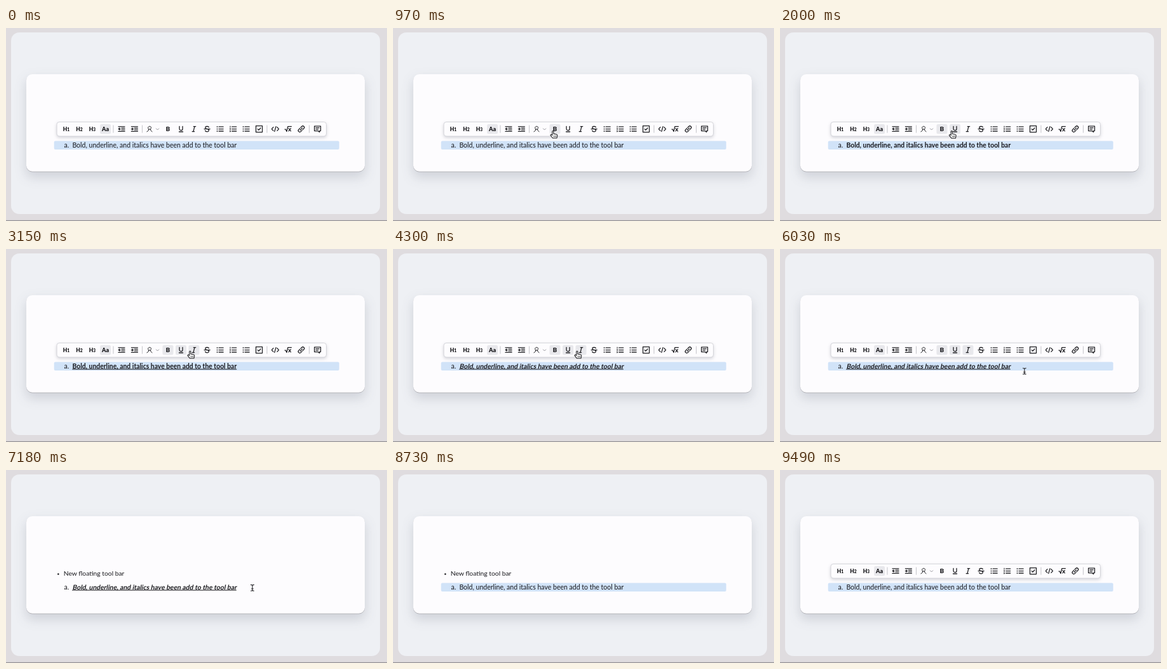
Recreate the animation shown at these times as an HTML page. Size 600x305 px, loop 9550 ms.

```html
<!DOCTYPE html>
<html lang="en">
<head>
<meta charset="utf-8">
<title>Floating tool bar</title>
<style>
html, body { margin: 0; width: 100%; height: 100%; overflow: hidden; background: #dfdcdf; }
svg { display: block; width: 100%; height: 100%; }
text { font-family: Lato, "Open Sans", sans-serif; fill: #17171b; }
.body { font-size: 10.53px; }
.bold { font-size: 10.4px; font-weight: 700; }
.line { fill: none; stroke: #202024; stroke-width: 1.3; stroke-linecap: round; stroke-linejoin: round; }
.thin { stroke-width: 1; }
.pill { fill: #e8e8ec; }
.card { filter: drop-shadow(0 8px 9px rgba(50, 55, 75, .17)); }
.bar { filter: drop-shadow(0 2px 2.5px rgba(50, 55, 75, .2)); }
</style>
</head>
<body>
<svg viewBox="0 0 600 305">
  <rect width="600" height="305" fill="#dfdcdf"/>
  <rect y="303.8" width="600" height="1.2" fill="#918f92"/>
  <rect x="8" y="7" width="581" height="287" rx="13" fill="#eef0f4"/>
  <g class="card">
    <rect x="32" y="74" width="533" height="153.5" rx="9.5" fill="#a9a9ae"/>
    <rect x="32" y="73" width="533" height="153.7" rx="9.5" fill="#fdfcfe"/>
  </g>
  <circle cx="82.3" cy="164.5" r="1.3" fill="#17171b"/>
  <text x="90.7" y="167.4" font-size="10.3">New floating tool bar</text>
  <rect id="mark" x="75.7" y="178.4" width="449" height="13.6" rx="2" fill="#d1e3f8"/>
  <text class="body" x="91.6" y="188.5">a.</text>
  <g transform="translate(104.4 188.5)"><text id="copy" class="body"></text></g>
  <g id="bar">
    <rect class="bar" x="80" y="148.5" width="424.5" height="22.5" rx="4" fill="#fdfcfe" stroke="#d2d2d7" stroke-width=".9"/>
    <g id="pills"></g>
    <g id="icons"></g>
  </g>
  <g id="hand">
    <path d="M-1.2 .4C-1.2-.9 .9-.9 .9 .4V4.1L5.2 5C6.5 5.3 7 6.1 6.8 7.3L6 11H-.4L-3.8 6.9C-4.5 5.9-3.2 4.8-2.3 5.5L-1.2 6.5Z"
      fill="#fff" stroke="#222226" stroke-width="1.1" stroke-linejoin="round"/>
    <path d="M1.2 7.2V9.2M3 7.2V9.2M4.7 7.2V9.2" class="line" stroke-width=".7" style="stroke-width:.7"/>
  </g>
  <path id="beam" class="line" style="stroke-width:1.1"
    d="M-2.4-4.8Q0-4.8 0-3.5Q0-4.8 2.4-4.8M0-3.5V3.5M-2.4 4.8Q0 4.8 0 3.5Q0 4.8 2.4 4.8M-1.3 1.6H1.3"/>
</svg>
<script>
const LOOP = 9550;
const $ = id => document.getElementById(id);
const MID = 159.6;

// Toolbar icons, each drawn around its own centre
const path = (d, cls = "") => `<path class="line ${cls}" d="${d}"/>`;
const label = (s, size, attrs = "") =>
  `<text text-anchor="middle" y="${size * 0.36}" font-size="${size}" font-weight="900" ${attrs}>${s}</text>`;
const heading = n => label(`H<tspan font-size="6.6">${n}</tspan>`, 8.4);
const rows = path("M-2-3.4H5M-2 0H5M-2 3.4H5");
const dots = [-3.4, 0, 3.4].map(y => `<circle cx="-4.6" cy="${y}" r=".9" fill="#202024"/>`).join("");
const indent = arrow => path("M-5-3.8H5M0-1.3H5M0 1.3H5M-5 3.8H5") + path(arrow);
const divider = '<path d="M0-6V6" stroke="#c3c3c8" stroke-width="1"/>';

const icons = [
  [95, heading(1)], [115.4, heading(2)], [136, heading(3)],
  [156.6, label("Aa", 9)],
  [169, divider],
  [182, indent("M-3-1.5L-4.7 0L-3 1.5M-4.5 0H-2")],
  [202.4, indent("M-3.6-1.5L-2 0L-3.6 1.5M-5 0H-2.4")],
  [214.6, divider],
  [226, path("M-4 4.3C-2 3.5-1.4 1.8-1.4 .2C-3-1.2-2.4-4.2 .2-4.2C2.8-4.2 3.2-1.2 1.5 .2C1.8 2 2.6 3.6 4 4.3M-1.4 .5H1.5", "thin")],
  [238.6, '<path d="M-2.4-1L0 1.4L2.4-1" fill="none" stroke="#98989f"/>'],
  [255, label("B", 9.6)],
  [275.6, path("M-2.5-4.2V-.4C-2.5 3 2.5 3 2.5-.4V-4.2M-3 4.4H3")],
  [296, path("M-.7-4H2.8M-2.8 4H.7M1-4L-1 4")],
  [316.7, path("M2.9-2.7C2-4.7-2.8-4.6-2.8-2.2C-2.8-.8-1 0 .5 0C2 .4 3 1.2 2.8 2.4C2.4 4.8-2.4 4.7-3 2.6M-4.6 0H4.6")],
  [337.2, rows + dots],
  [357.8, rows + path("M-4.7-4.4V-2.5M-5.2-.7H-4.3V.7H-5M-5.2 2.7H-4.3V4.3H-5.2", "thin")],
  [378.2, rows + dots],
  [398.6, path("M-5-5H5V5H-5ZM-2.2 0L-.6 1.7L2.4-1.6")],
  [411, divider],
  [424, path("M-3-2.8L-5.6 0L-3 2.8M3-2.8L5.6 0L3 2.8M1.1-4L-1.1 4")],
  [444.3, path("M-5.2 .5H-3.9L-2.3 4L-.4-4H5.2M.8-.9L4.2 3.3M4.2-.9L.8 3.3")],
  [465, `<g transform="rotate(-45)">${path("M-.8-2.3H-3.4C-6.5-2.3-6.5 2.3-3.4 2.3H-.8M.8-2.3H3.4C6.5-2.3 6.5 2.3 3.4 2.3H.8M-2.4 0H2.4")}</g>`],
  [477.6, divider],
  [490.6, path("M-4.9-4.5H4.9V3H3V5L.8 3H-4.9ZM-2.6-2H2.6M-2.6 .5H1")]
];
$("icons").innerHTML = icons.map(([x, art]) => `<g transform="translate(${x} ${MID})">${art}</g>`).join("");

const pill = (x, id) => `<rect class="pill" id="${id}" x="${x - 8.5}" y="152" width="17" height="15.3" rx="2.5"/>`;
$("pills").innerHTML = pill(156.6, "case") + pill(255, "bold") + pill(275.6, "under") + pill(296, "italic");

$("copy").textContent = "Bold, underline, and italics have been add to the tool bar";

// Moments when the document changes
const on = { bold: 1050, under: 2200, italic: 3250 };
const buttons = { bold: 255, under: 275.6, italic: 296 };
const DESELECT = 6550, RESET = 8330, REOPEN = 9000;

// Pointer stops: time, x, y
const stops = [
  [330, 296, 208], [850, 252, 163], [1300, 252, 163], [1680, 270.5, 163.2],
  [2420, 270.5, 163.2], [2820, 290, 161.8], [4920, 290, 161.8],
  [5780, 385, 193], [6650, 385, 193], [7000, 388, 186.2], [RESET, 388, 186.2]
];
const ease = k => k * k * (3 - 2 * k);

function pointer(t) {
  const i = stops.findIndex(s => s[0] > t);
  if (i < 1) return null;
  const [t0, x0, y0] = stops[i - 1], [t1, x1, y1] = stops[i];
  const k = ease((t - t0) / (t1 - t0));
  return { x: x0 + (x1 - x0) * k, y: y0 + (y1 - y0) * k };
}

const show = (el, yes) => el.setAttribute("visibility", yes ? "visible" : "hidden");

function draw(t) {
  const p = pointer(t);
  const open = t < DESELECT || t >= REOPEN;
  const over = p && open && p.y < 171;
  const has = key => t >= on[key] && t < RESET;

  show($("bar"), open);
  show($("mark"), t < DESELECT || t >= RESET);
  for (const key in buttons) {
    const hover = over && p.y < 167.5 && Math.abs(p.x - buttons[key]) < 8.5;
    show($(key), open && (has(key) || hover));
  }

  const copy = $("copy");
  copy.setAttribute("class", has("bold") ? "bold" : "body");
  copy.setAttribute("text-decoration", has("under") ? "underline" : "none");
  copy.setAttribute("transform", has("italic") ? "skewX(-11)" : "");

  show($("hand"), over);
  show($("beam"), p && !over);
  if (p) (over ? $("hand") : $("beam")).setAttribute("transform", `translate(${p.x} ${p.y})`);
}

const start = performance.now();
function tick() {
  draw((performance.now() - start) % LOOP);
  requestAnimationFrame(tick);
}
tick();
</script>
</body>
</html>
```
